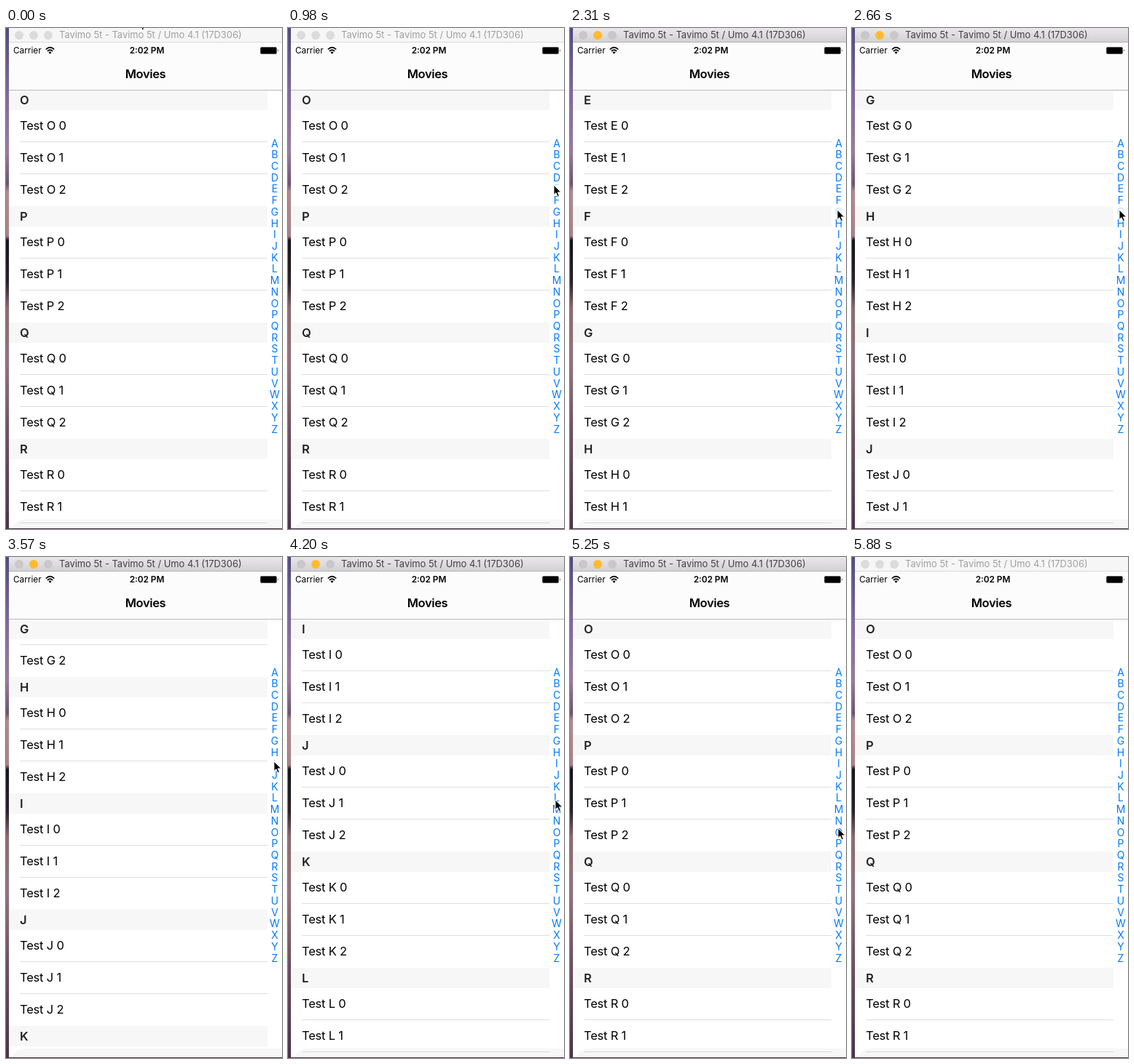
Recreate the animation shown at these times as an HTML page. Size 379x689 px, loop 6.37 s.

```html
<!DOCTYPE html>
<html lang="en">
<head>
<meta charset="utf-8">
<title>Indexed list</title>
<style>
  html, body { margin: 0; width: 100%; height: 100%; overflow: hidden; }
  body {
    position: relative;
    font-family: Inter, Roboto, "Liberation Sans", sans-serif;
    color: #000;
    background: linear-gradient(#514a7c 0, #7d699b 90px, #9a7b9d 170px, #6d536f 215px, #b08a92 225px,
      #a98188 286px, #17131a 292px, #2a2029 350px, #8a6a70 385px, #93727a 460px, #6b5060 560px, #4b3347 689px);
  }
  .window > *, .dot { position: absolute; }
  .window { position: absolute; left: 4px; top: 0; width: 375px; height: 688px; background: #fff; overflow: hidden; }

  .titlebar {
    left: 0; top: 0; width: 375px; height: 20px; box-sizing: border-box;
    background: #f6f6f6; border-bottom: 1px solid #dadada;
    font-size: 12.9px; line-height: 20px; color: #a0a0a0;
  }
  .titlebar span { position: absolute; left: 69px; top: 0; white-space: nowrap; }
  .dot { top: 4px; width: 12px; height: 12px; border-radius: 50%; background: #dcdcdc; }
  .active .titlebar { background: linear-gradient(#e9e7e9, #d3d1d3); border-color: #b4b2b4; color: #414141; }
  .active .dot { background: #c9c7c9; }
  .active .dot.amber { background: #fdbc2e; }

  .nav { left: 0; top: 20px; width: 375px; height: 66px; box-sizing: border-box; background: #fcfcfc; border-bottom: 1px solid #b9b9bb; }
  .carrier { left: 6px; top: 24px; font-size: 11.8px; line-height: 15px; }
  .clock { left: 2px; width: 375px; top: 24px; text-align: center; font: 600 11.8px/15px Inter, Roboto, sans-serif; }
  .heading { left: 0; width: 375px; top: 52px; text-align: center; font: 600 16.5px/22px Inter, Roboto, sans-serif; letter-spacing: -.4px; }

  .list { left: 0; top: 85px; width: 355px; height: 603px; overflow: hidden; isolation: isolate; font-size: 16.5px; letter-spacing: -.2px; }
  .section { position: relative; height: 160px; }
  .section h2 {
    position: sticky; top: 0; z-index: 1; margin: 0; padding-left: 15px; height: 28px;
    font: 600 16.5px/29px Inter, Roboto, sans-serif; color: #222; background: #f7f7f7;
  }
  .row { height: 44px; margin-left: 15px; box-sizing: border-box; line-height: 42px; border-bottom: 1px solid #dededf; }
  .row:last-child { border: 0; }
  .foot { left: 6px; top: 676px; width: 369px; height: 12px; background: #f7f7f7; border-radius: 16px 0 0 0 / 12px 0 0 0; mix-blend-mode: multiply; }
  .letter { left: 350px; width: 30px; text-align: center; font-size: 14px; line-height: 16px; color: #007aff; }
  .letter.pressed { opacity: .25; }
  #pointer { position: absolute; left: 0; top: 0; }
</style>
</head>
<body>
<div class="window" id="window">
  <div class="list" id="list"></div>
  <div class="foot"></div>
  <div class="nav"></div>
  <div class="titlebar">
    <i class="dot" style="left:8px"></i><i class="dot amber" style="left:28px"></i><i class="dot" style="left:48px"></i>
    <span>Tavimo 5t - Tavimo 5t / Umo 4.1 (17D306)</span>
  </div>
  <div class="carrier">Carrier</div>
  <svg style="left:50px;top:25px" width="13" height="12" fill="none" stroke="#000" stroke-width="1.7">
    <path d="M.8 4.5Q6.5-1.2 12.2 4.5M2.9 6.9Q6.5 3.2 10.1 6.9"/>
    <path d="M4.5 8.6Q6.5 6.6 8.5 8.6L6.5 10.7Z" fill="#000" stroke="none"/>
  </svg>
  <div class="clock">2:02 PM</div>
  <svg style="left:345px;top:26px" width="26" height="11">
    <rect x=".5" y=".5" width="22" height="9" rx="1.5" fill="#000" stroke="#555"/>
    <path d="M24 3.2q1.6 1.8 0 3.6z"/>
  </svg>
  <div class="heading">Movies</div>
</div>
<svg id="pointer" width="12" height="18">
  <path d="M1 1V14.5L4 11.7 6.2 16.7 8.5 15.7 6.4 10.9H10.8Z" stroke="#fff" stroke-width="1"/>
</svg>
<script>
const LOOP = 6370, STEP = 70, SECTION = 160, SCROLL_TIME = 320;
const alphabet = [...'ABCDEFGHIJKLMNOPQRSTUVWXYZ'];
const frame = document.getElementById('window');
const list = document.getElementById('list');
const pointer = document.getElementById('pointer');

list.innerHTML = alphabet.map(c =>
  `<div class="section"><h2>${c}</h2>${[0, 1, 2].map(n => `<div class="row">Test ${c} ${n}</div>`).join('')}</div>`
).join('');

const letters = alphabet.map((c, i) => {
  const el = document.createElement('div');
  el.className = 'letter';
  el.textContent = c;
  el.style.top = 150.5 + i * 15.72 + 'px';
  frame.append(el);
  return el;
});

const taps = [
  { letter: 'E', press: 910, scroll: 1269.5, release: 1610 },
  { letter: 'G', press: 2310, scroll: 2320, release: 2730 },
  { letter: 'I', press: 3290, scroll: 3465.5, release: 3780 },
  { letter: 'O', press: 4620, scroll: 4864.5, release: 5250 }
].map(tap => ({ ...tap, index: alphabet.indexOf(tap.letter) }));

// Pointer tip: time, x, y
const path = [
  [0, 181, -14], [70, 181, -14], [140, 215, 42], [210, 275, 130], [280, 315, 191], [420, 315, 191],
  [770, 361, 213], [840, 361, 213], [980, 364, 215], [1190, 366, 218], [1680, 366, 218],
  [2100, 366, 249], [2660, 366, 249], [2940, 368, 276], [3150, 367, 280], [3700, 367, 280],
  [3920, 366, 298], [4480, 366, 368], [4550, 366, 368], [4690, 367, 372], [5250, 367, 372],
  [5320, 352, 295], [5390, 305, 150], [5460, 228, 6], [5530, 200, -40], [LOOP, 200, -40]
];

const mix = (a, b, k) => a + (b - a) * k;
const smooth = k => k * k * (3 - 2 * k);
const clamp = k => Math.min(1, Math.max(0, k));

function pointerAt(t) {
  const i = path.findIndex(p => p[0] > t);
  const [a, b] = [path[i - 1], path[i]];
  const k = (t - a[0]) / (b[0] - a[0]);
  return [mix(a[1], b[1], k), mix(a[2], b[2], k)];
}

function scrollAt(t) {
  return taps.reduce((y, tap) =>
    mix(y, tap.index * SECTION, smooth(clamp((t - tap.scroll) / SCROLL_TIME))),
    alphabet.indexOf('O') * SECTION);
}

function draw() {
  const t = Math.floor(performance.now() % LOOP / STEP) * STEP;
  const [x, y] = pointerAt(t).map(Math.round);
  pointer.style.transform = `translate(${x}px, ${y}px)`;
  list.scrollTop = Math.round(scrollAt(t));
  frame.classList.toggle('active', t >= 1050 && t < 5880);
  for (const tap of taps)
    letters[tap.index].classList.toggle('pressed', t >= tap.press && t < tap.release);
  requestAnimationFrame(draw);
}
draw();
</script>
</body>
</html>
```
